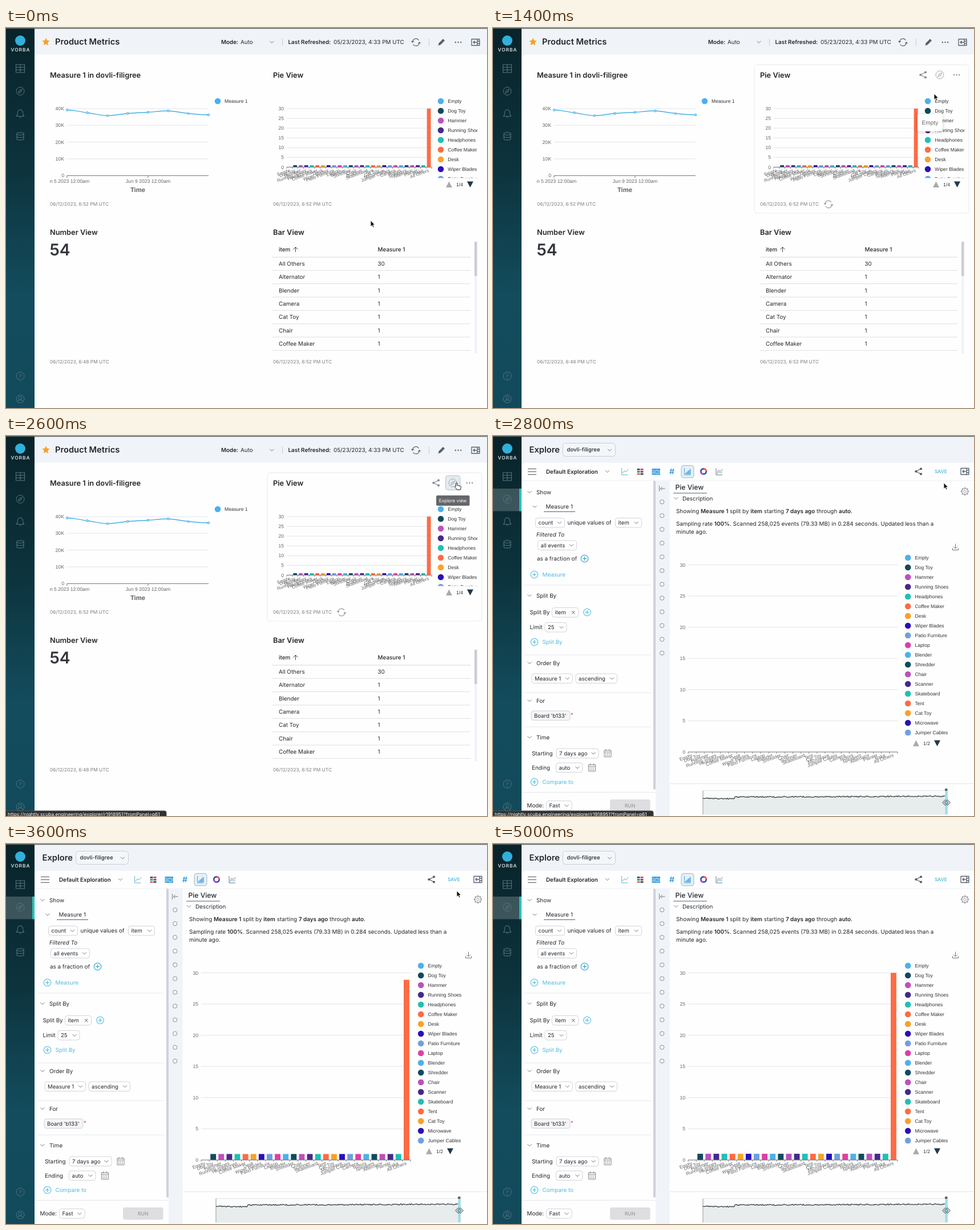
Recreate the animation shown at these times as an HTML page. Size 843 by 665 pixels, loop 6 s.

```html
<!DOCTYPE html>
<html lang="en">
<head>
<meta charset="utf-8">
<title>Dashboard to explorer</title>
<style>
html, body { margin: 0; width: 100%; height: 100%; overflow: hidden; background: #fefefe; }
svg { display: block; width: 843px; height: 665px; }
text { font-family: Inter, sans-serif; text-rendering: geometricPrecision; white-space: pre; }
.chart { font-family: "Liberation Sans", Arial, sans-serif; }
</style>
</head>
<body>
<svg id="stage" viewBox="0 0 843 665"></svg>
<script>
const LOOP = 6000, STEP = 200;
const INK = '#24272b', GREY = '#7b8087', BLUE = '#45afe3', CYAN = '#52bbdd', PANEL = '#f0f4f9';
const PALETTE = ['#4cb0ee', '#124a5c', '#bd50bb', '#45298c', '#22bfb3', '#fd6c45', '#f8a12c', '#2a10b6', '#6f9fdf', '#dd40a3'];
const ITEMS = ['Empty', 'Dog Toy', 'Hammer', 'Running Shoes', 'Headphones', 'Coffee Maker', 'Desk', 'Wiper Blades',
  'Patio Furniture', 'Laptop', 'Blender', 'Shredder', 'Chair', 'Scanner', 'Skateboard', 'Tent', 'Cat Toy', 'Microwave',
  'Jumper Cables', 'Camera', 'Rotors', 'Speakers', 'Alternator', 'Planter', 'Rake', 'All Others'];
const WORKSPACE = 'dovli-filigree';

// Drawing helpers, each returns SVG markup
const range = (n, f) => Array.from({ length: n }, (_, i) => f(i)).join('');
const text = (x, y, s, size = 9.87, fill = INK, weight = 400, extra = '') =>
  `<text x="${x}" y="${y}" font-size="${size}" fill="${fill}" font-weight="${weight}" ${extra}>${s}</text>`;
const label = (x, y, s, size = 8.6, fill = '#333', anchor = 'start', extra = '') =>
  text(x, y, s, size, fill, 400, `class="chart" text-anchor="${anchor}" ${extra}`);
const rect = (x, y, w, h, fill, stroke = 'none', r = 0) =>
  `<rect x="${x}" y="${y}" width="${w}" height="${h}" rx="${r}" fill="${fill}" stroke="${stroke}"/>`;
const circle = (x, y, r, fill, stroke = 'none', w = 1) =>
  `<circle cx="${x}" cy="${y}" r="${r}" fill="${fill}" stroke="${stroke}" stroke-width="${w}"/>`;
const path = (d, stroke = GREY, w = 1, fill = 'none') =>
  `<path d="${d}" stroke="${stroke}" stroke-width="${w}" fill="${fill}" stroke-linejoin="round"/>`;
const hline = (x1, x2, y, stroke, w = 1) => path(`M${x1} ${y}H${x2}`, stroke, w);
const at = (x, y, body) => `<g transform="translate(${x} ${y})">${body}</g>`;
const group = (id, body) => `<g id="${id}">${body}</g>`;

// Icons
const chevron = (x, y, c = '#777') => path(`M${x - 3.5} ${y - 1.7}l3.5 3.5 3.5-3.5`, c);
const dots = (x, y, c) => range(3, i => circle(x - 4.7 + i * 4.7, y, 1.2, c));
const compass = (x, y, c, r = 7) => circle(x, y, r, 'none', c) + path(`M${x + 3.5} ${y - 3.5}l-2 5-5 2 2-5z`, c) + circle(x, y, .8, c);
const share = (x, y, c) => path(`M${x + 4.5} ${y - 4.5}L${x - 4} ${y}l8.5 4.5`, c, 1.3) +
  circle(x + 4.5, y - 4.5, 2.1, c) + circle(x - 4.2, y, 2.1, c) + circle(x + 4.5, y + 4.5, 2.1, c);
const refresh = (x, y, c) => at(x, y, path('M-6-1A6 6 0 0 1 5-3.5M6 1A6 6 0 0 1-5 3.5M-8-2l2 2 2-2M8 2L6 0 4 2', c, 1.2));
const dock = (x, y) => at(x, y, path('M-7-5.5H7v11H-7zM3-5.5v11M2 0h-6M-1.5-2.5L-4 0l2.5 2.5M3-2h4M3 2h4', '#566270', 1.3));
const plus = (x, y, c = CYAN) => circle(x, y, 6.3, 'none', c, 1.1) + path(`M${x - 3.5} ${y}h7M${x} ${y - 3.5}v7`, c, 1.2);
const calendar = (x, y) => at(x, y, path('M-6-5H6V6.5H-6zM-6-2H6M-3-7v3M3-7v3', '#888') +
  range(6, i => rect(-4 + i % 3 * 3, (i / 3 | 0) * 3, 1.7, 1.6, '#999')));
const pill = (x, y, w, s, { fill = '#fff', mark = 'chevron', h = 16.5 } = {}) =>
  rect(x + .5, y + .5, w - 1, h, fill, '#d0d3d8', 4) + text(x + 5.5, y + 12, s, 9.6) +
  (mark === 'chevron' ? chevron(x + w - 9.5, y + 8.7) : mark === 'x' ? path(`M${x + w - 12} ${y + 6}l5.5 5.5m0-5.5l-5.5 5.5`, '#555') : '');

// Charts
const legend = (x, y, n) => range(n, i => circle(x, y + i * 17, 5.3, PALETTE[i % 10]) + label(x + 12.3, y + 3 + i * 17, ITEMS[i]));
const pager = (x, y, s) => path(`M${x - 5.5} ${y + 5}h11l-5.5-10.5z`, 'none', 0, '#aaa') +
  label(x + 12.5, y + 3, s) + path(`M${x + 31.5} ${y - 5.5}h11l-5.5 10.5z`, 'none', 0, '#22384a');
function barChart(id, { left, right, top, base, size }) {
  const slot = (right - left) / ITEMS.length, bar = slot * .7, unit = (base - top) / 30, mid = i => left + slot * (i + .5);
  const grid = range(7, i => {
    const y = base - i * 5 * unit;
    return (i ? hline(left, right, y, '#e0e3ea') : '') + label(left - 5, y + 3, i * 5, 8.6, '#666', 'end');
  });
  const bars = range(ITEMS.length - 1, i => {
    const h = (i === 24 ? 30 : 1) * unit;
    return rect(mid(i + 1) - bar / 2, -h, bar, h, PALETTE[(i + 1) % 10]);
  });
  const names = range(ITEMS.length, i => `<g transform="translate(${mid(i)} ${base + 6}) rotate(-20)">${label(0, 2, ITEMS[i], size, '#666', 'end')}</g>`);
  const ticks = range(ITEMS.length + 1, i => path(`M${left + i * slot} ${base}v3`, '#6e7079', .8));
  return grid + names + at(0, base, group(id, bars)) + hline(left, right, base, '#6e7079') + ticks;
}
function lineChart() {
  const ys = [143.5, 148.3, 153.4, 149.5, 147.5, 145, 149.6, 152], x = i => 107 + i * 35.43;
  const slope = i => i && i < 7 ? (ys[i + 1] - ys[i - 1]) / 6 : 0;
  let d = `M${x(0)} ${ys[0]}`;
  for (let i = 1; i < 8; i++)
    d += `C${x(i - 1) + 11.8} ${ys[i - 1] + slope(i - 1)} ${x(i) - 11.8} ${ys[i] - slope(i)} ${x(i)} ${ys[i]}`;
  return range(5, i => {
    const y = 258.3 - i * 29.3;
    return hline(107, 355, y, i ? '#e0e3ea' : '#6e7079') + label(102, y + 3, i ? i + '0K' : 0, 8.7, '#666', 'end');
  }) + path('M107 258v4M249 258v4', '#6e7079') + path(d, BLUE, 1.4) +
    range(8, i => circle(x(i), ys[i], 1.6, '#fff', BLUE, 1.2)) +
    `<g clip-path="url(#lineClip)">${label(107, 271, 'Jun 5 2023 12:00am', 8.6, '#666', 'middle')}</g>` +
    label(249, 271, 'Jun 9 2023 12:00am', 8.6, '#666', 'middle') +
    text(231, 287, 'Time', 11.3, '#5f6168', 700, 'class="chart" text-anchor="middle"') +
    circle(371, 128, 5.3, PALETTE[0]) + label(383, 131, 'Measure 1');
}

function sidebar() {
  const c = '#55747e';
  return rect(0, 0, 50, 665, 'url(#side)') + group('active', rect(0, 92, 50, 39.5, '#ffffff33') + rect(46, 92, 4, 39.5, '#24c4b8')) +
    circle(25, 22, 9, '#31b0da') + text(25.5, 41, 'VORBA', 8.4, '#eef5f6', 500, 'text-anchor="middle" letter-spacing="1"') +
    at(25, 71, path('M-7.5-7H7.5V7H-7.5zM-7.5-2.3H7.5M-7.5 2.3H7.5M0-7V7', c, 1.1)) + compass(25, 110.5, c) +
    at(25, 150, path('M-6.5 4.5c2-2 1.5-4 2-7a4.5 4.5 0 0 1 9 0c.5 3 0 5 2 7zM-1.5 6.5h3', c, 1.1)) +
    at(25, 189.5, path('M-6-4.5v9c0 3 12 3 12 0v-9M-6 0c0 3 12 3 12 0M-6-4.5c0-3 12-3 12 0s-12 3-12 0', c, 1.1)) +
    circle(25, 609, 7, 'none', c) + text(25, 612.5, '?', 9.5, c, 400, 'text-anchor="middle"') +
    circle(25, 649, 7, 'none', c) + circle(25, 647.5, 2.8, 'none', c) + path('M20 654c1-4 9-4 10 0', c);
}

function dashboard() {
  const heading = (x, y, s) => text(x, y, s, 12.8, INK, 600);
  const stamp = (x, y, s) => text(x, y, s, 8.4, GREY);
  const star = range(10, i => {
    const a = i * Math.PI / 5, r = i % 2 ? 3.4 : 7;
    return `${(70 + r * Math.sin(a)).toFixed(1)},${(24.5 - r * Math.cos(a)).toFixed(1)} `;
  });
  const rows = ['All Others', 'Alternator', 'Blender', 'Camera', 'Cat Toy', 'Chair', 'Coffee Maker'];
  return rect(50, 0, 793, 46.5, PANEL) + `<polygon points="${star}" fill="#f9a11f"/>` +
    text(86, 29.3, 'Product Metrics', 14.7, INK, 600) +
    text(377, 28, 'Mode:', 9.87, INK, 600) + text(411, 28, 'Auto') + chevron(466, 24.5) +
    text(494.5, 28, 'Last Refreshed:', 9.87, INK, 600) + text(574, 28, '05/23/2023, 4:33 PM UTC') +
    path('M484.5 19v12M741.5 19v12', '#c3c9d2') + refresh(718.5, 25, '#566270') +
    path('M757.5 30.5l1-4 7.5-7.5 3 3-7.5 7.5z', 'none', 0, '#566270') + dots(792.5, 25, '#566270') + dock(823, 25) +
    heading(77, 86.5, 'Measure 1 in ' + WORKSPACE) + lineChart() + stamp(77, 311, '06/12/2023, 6:52 PM UTC') +
    group('card', rect(458, 64.5, 376, 259.5, 'none', '#e9ebee', 4) + share(753.5, 82, '#8b8f95') +
      group('button', rect(770.5, 69.5, 25.5, 25, '#e2ebf0', '#b3c2ca', 4)) +
      compass(783, 82, '#a5aab0') + dots(812.5, 82, '#8b8f95') + refresh(588, 308.5, '#979ca2')) +
    heading(468, 86.5, 'Pie View') + barChart('smallBars', { left: 492, right: 746, top: 141, base: 243.5, size: 7.9 }) +
    `<g clip-path="url(#legendClip)">${legend(762, 128, 9)}</g>` + pager(776.5, 274, '1/4') + stamp(468, 311, '06/12/2023, 6:52 PM UTC') +
    heading(77, 362, 'Number View') + text(76.5, 397.5, '54', 28.3, '#33363b', 600) + stamp(77, 586.5, '06/12/2023, 6:48 PM UTC') +
    heading(468, 362, 'Bar View') + text(478, 391, 'item', 9.87, INK, 500) + path('M507.5 392v-8.5M503.5 387.5l4-4 4 4', '#444') +
    text(651.5, 391, 'Measure 1', 9.87, INK, 500) + hline(467, 814, 401, '#d4d7dc') +
    rows.map((s, i) => {
      const y = 412.5 + i * 23.35;
      return text(478, y + 3.5, s) + text(651.5, y + 3.5, i ? 1 : 30) + hline(467, 814, y + 11.7, '#dcdfe3');
    }).join('') + rect(821, 374, 4.5, 196, '#eff3f9') + rect(821, 374, 4.5, 60, '#cccdd6', 'none', 1) +
    stamp(468, 586.5, '06/12/2023, 6:52 PM UTC') +
    group('emptyTip', rect(744, 150.5, 44, 30.5, '#fff', 'none', 3) + label(751.5, 169, 'Empty', 10.2, '#666')) +
    group('exploreTip', rect(754, 104, 58.5, 18, '#65676b', 'none', 2) + text(783, 116, 'Explore view', 8.1, '#fff', 400, 'text-anchor="middle"'));
}

function toolbar() {
  const blue = '#4ba6dd';
  return path('M61 57.5h15M61 62.5h15M61 67.5h15', '#555', 1.2) + text(93, 66, 'Default Exploration', 9.87, INK, 600) + chevron(200.5, 62) +
    path('M225.5 56v12h11M227 65l3-4 3 2 4-5', '#62b2cf') +
    range(6, i => rect(252.5 + i % 2 * 6, 57 + (i / 2 | 0) * 4, 5, 3, ['#555', '#d64a8b', '#28a58f', '#666', '#e66', '#555'][i])) +
    rect(278.5, 57, 14.5, 11, blue) + path('M279 60l4 2 4-2 6 2M279 65l5-1 4 2 5-2', '#d7ecfb') +
    text(313.5, 67, '#', 14, '#3c97d5', 600, 'text-anchor="middle"') +
    rect(330, 51.5, 22, 21.5, '#e5f0f8', '#a0b4c2', 4) + path('M335.5 56v12h11', blue) + range(4, i => rect(337.5 + i * 2.4, 64 - i * 2, 1.8, 3 + i * 2, blue)) +
    circle(369, 62, 4.7, 'none', '#2d49a8', 2.7) + path('M369 57.3a4.7 4.7 0 0 1 4.7 4.7', '#ee5a5a', 2.7) + path('M364.3 62a4.7 4.7 0 0 0 4.7 4.7', '#a64ab8', 2.7) +
    path('M391 56v12h11M392.5 64l3-4 3 2 4-4', '#777') + path('M392.5 66l4-3 3 2 3-3', blue) +
    share(745.5, 62, '#555e68') + text(774, 65, 'SAVE', 8.4, '#40b4db', 500) + dock(827, 62);
}

function queryPanel() {
  const section = (y, s) => chevron(64, y) + text(76, y + 3.5, s);
  const add = (x, y, s) => plus(x, y) + text(x + 14, y + 3.5, s, 9.87, CYAN);
  return section(98, 'Show') + chevron(73, 123.5) + text(92.5, 127, 'Measure 1') + hline(89, 144, 132.5, '#555b78') +
    pill(74, 143, 52, 'count') + text(130.5, 155, 'unique values of') + pill(214, 143, 47, 'item') +
    text(76, 175.5, 'Filtered To', 9.87, INK, 400, 'font-style="italic"') + pill(78, 182.5, 69, 'all events') +
    text(77, 218, 'as a fraction of') + plus(160.5, 214.5, '#2a9fc6') + add(72.5, 242.5, 'Measure') +
    section(279, 'Split By') + text(64.5, 312, 'Split By') + pill(103, 300, 47, 'item', { mark: 'x' }) + plus(165, 308.5) +
    text(64.5, 338, 'Limit') + pill(90.5, 326, 39, '25') + add(72.5, 360.5, 'Split By') +
    section(397, 'Order By') + pill(67.5, 415.5, 72.5, 'Measure 1') + pill(144.5, 415.5, 73.5, 'ascending') +
    section(463, 'For') + pill(66.5, 480.5, 69, "Board 'b133'", { fill: '#f5f5f7', mark: '' }) + text(136, 491, '*', 9, '#c2405c') +
    section(527, 'Time') + text(68, 559, 'Starting') + pill(110.5, 546.5, 75, '7 days ago') + calendar(201, 555) +
    text(68, 583.5, 'Ending') + pill(110, 571.5, 47.5, 'auto') + calendar(173.5, 580) + add(72.5, 605.5, 'Compare to') +
    [261, 383, 449, 509].map(y => hline(55, 277, y, '#e4e7ec')).join('') + hline(50, 285, 623.5, '#e4e7ec') +
    text(59.5, 650, 'Mode:') + pill(93, 638, 45.5, 'Fast') + rect(205, 636, 70.5, 21.5, '#dedde0', 'none', 3) +
    text(240, 650, 'RUN', 8.7, '#9a9a9e', 500, 'text-anchor="middle"') +
    rect(281, 78, 4, 541, '#cfd1da', 'none', 2) + rect(285, 78, 24.5, 587, PANEL) +
    path('M291.5 87v10M301.5 92h-8M296.5 89l-3 3 3 3', '#777') + range(12, i => circle(296.2, 115.3 + i * 24.05, 3.6, '#fff', '#80868d'));
}

function timeRange() {
  const noise = i => { const n = Math.sin(i * 91.7 + 4) * 4373.1; return n - Math.floor(n) - .5; };
  let d = 'M368.5 635';
  for (let i = 0; i < 285; i++) {
    const x = 368.5 + i * 1.5;
    d += `L${x} ${((x < 424 ? 634.3 : 631.8 - (x - 424) / 260) + noise(i) * 2.2).toFixed(1)}`;
  }
  return hline(310, 843, 608.5, '#e4e7ec') + rect(368, 620.5, 429, 41.5, '#fbfcfc', '#dfe2e4') +
    path(d + 'V661.5H368.5z', 'none', 0, '#e7eced') + path('M368 620.5V662', '#9a9fa2') + path(d, '#3c4144', 1.3) +
    rect(792.5, 620.5, 4, 41.5, '#9adfe7') + rect(792, 617, 4.5, 4, '#566', 'none', 1) +
    path('M787.5 641.5l5-5 5 5-5 5zM791.5 641.5l5-5 5 5-5 5z', '#4b5c66', 1, '#9fb4bd88');
}

function explorer() {
  const b = s => `<tspan font-weight="600">${s}</tspan>`;
  const gear = '#9da2a8';
  const teeth = range(8, i => `<rect x="-1.5" y="-7" width="3" height="2.5" fill="${gear}" transform="rotate(${i * 45})"/>`);
  return rect(50, 0, 793, 47, PANEL) + text(63.5, 29.3, 'Explore', 14.7, INK, 600) +
    rect(122.5, 12.5, 92, 23, '#f4f7fa', '#c9ced4', 5) + text(129.5, 27, WORKSPACE, 9.6, INK, 500) + chevron(204.5, 24.5) +
    toolbar() + hline(50, 843, 78, '#eceff3') + queryPanel() +
    text(319.5, 94, 'Pie View', 12.1, INK, 500) + hline(316, 375, 100, '#555b78') + chevron(320.5, 109) + text(332, 112.5, 'Description') +
    at(827, 97, teeth + circle(0, 0, 5, '#fefefe', gear) + circle(0, 0, 2.2, 'none', gear)) +
    text(321, 135, `Showing ${b('Measure 1')} split by ${b('item')} starting ${b('7 days ago')} through ${b('auto')}.`) +
    text(321, 156.5, `Sampling rate ${b('100%')}. Scanned 258,025 events (79.33 MB) in 0.284 seconds. Updated less than a`) +
    text(321, 170.5, 'minute ago.') + path('M810.5 188.5v8M807 193.5l3.5 3.5 3.5-3.5M805.5 196v3.5h10V196', '#777') +
    barChart('bigBars', { left: 342, right: 709, top: 225.5, base: 553, size: 8.2 }) +
    legend(727.2, 213, 19) + pager(741.5, 538, '1/2') + timeRange();
}

const url = 'https://nightly.scuba.engineering/explorer/r1918951?fromPanel=p61';
const stage = document.getElementById('stage');
stage.innerHTML = `<defs>
  <linearGradient id="side" x1="0" y1="0" x2="0" y2="1"><stop offset="0" stop-color="#09232a"/><stop offset=".35" stop-color="#0c323b"/><stop offset=".7" stop-color="#134c5d"/><stop offset="1" stop-color="#124a5b"/></linearGradient>
  <clipPath id="lineClip"><rect x="76" y="255" width="120" height="25"/></clipPath>
  <clipPath id="legendClip"><rect x="755" y="120" width="71" height="142.5"/></clipPath></defs>` +
  rect(0, 0, 843, 665, '#fefefe') + group('dashboard', dashboard()) + group('explorer', explorer()) + sidebar() + rect(0, 0, 843, 1.3, '#595d57') +
  group('status', rect(-4, 656, 285, 14, '#2f3132', '#555', 3) + text(3, 664.8, url, 8.4, '#fff')) +
  group('arrow', path('M0 0V10.5L2.5 8.3 4.2 12 6 11.2 4.4 7.6H7.6Z', '#fff', .8, '#111')) +
  group('hand', path('M-1.5 6V1a1.2 1.2 0 0 1 2.4 0v3.5l5 1c1.5.3 1.5 1 1.3 2.5L6.5 12H.5L-3 7.5c-.5-1.5.7-2 1.5-1.5z', '#222', 1, '#fff'));

const parts = Object.fromEntries([...stage.querySelectorAll('g[id]')].map(g => [g.id, g]));
parts.emptyTip.style.filter = 'drop-shadow(0 1px 3px #0003)';

// Pointer path: time, x, y
const POINTER = [[0, 639, 337], [400, 639, 337], [600, 700, 240], [800, 770, 144], [1000, 727, 170], [1400, 773, 115], [1600, 790, 82],
  [4000, 790, 82], [4200, 778, 84], [4400, 778, 84], [4600, 742, 86], [4800, 742, 77], [LOOP, 742, 77]];
function pointerAt(t) {
  const i = POINTER.findIndex(p => p[0] > t), [t0, x0, y0] = POINTER[i - 1], [t1, x1, y1] = POINTER[i];
  const k = (t - t0) / (t1 - t0);
  return [x0 + (x1 - x0) * k, y0 + (y1 - y0) * k];
}
const show = (id, opacity) => {
  parts[id].style.display = opacity ? '' : 'none';
  parts[id].style.opacity = +opacity;
};

function render(now) {
  const t = Math.floor(now % LOOP / STEP) * STEP;
  const exploring = t >= 2800, onButton = t >= 1600 && !exploring;
  show('dashboard', !exploring);
  show('explorer', exploring);
  show('active', exploring);
  show('card', t >= 600);
  show('emptyTip', t === 1400);
  show('button', onButton && (t < 1800 ? .5 : 1));
  show('exploreTip', t >= 2000);
  show('status', t >= 1600 && t < 3400 && (t < 3200 ? 1 : .5));
  show('hand', onButton);
  show('arrow', !onButton && t < 5000);
  const [x, y] = pointerAt(t);
  for (const id of ['arrow', 'hand']) parts[id].setAttribute('transform', `translate(${x} ${y})`);
  const progress = Math.min(1, Math.max(0, (t - 2933) / 1000));
  parts.bigBars.setAttribute('transform', `scale(1 ${1 - (1 - progress) ** 3})`);
}

const start = performance.now();
(function tick() {
  render(performance.now() - start);
  requestAnimationFrame(tick);
})();
</script>
</body>
</html>
```
